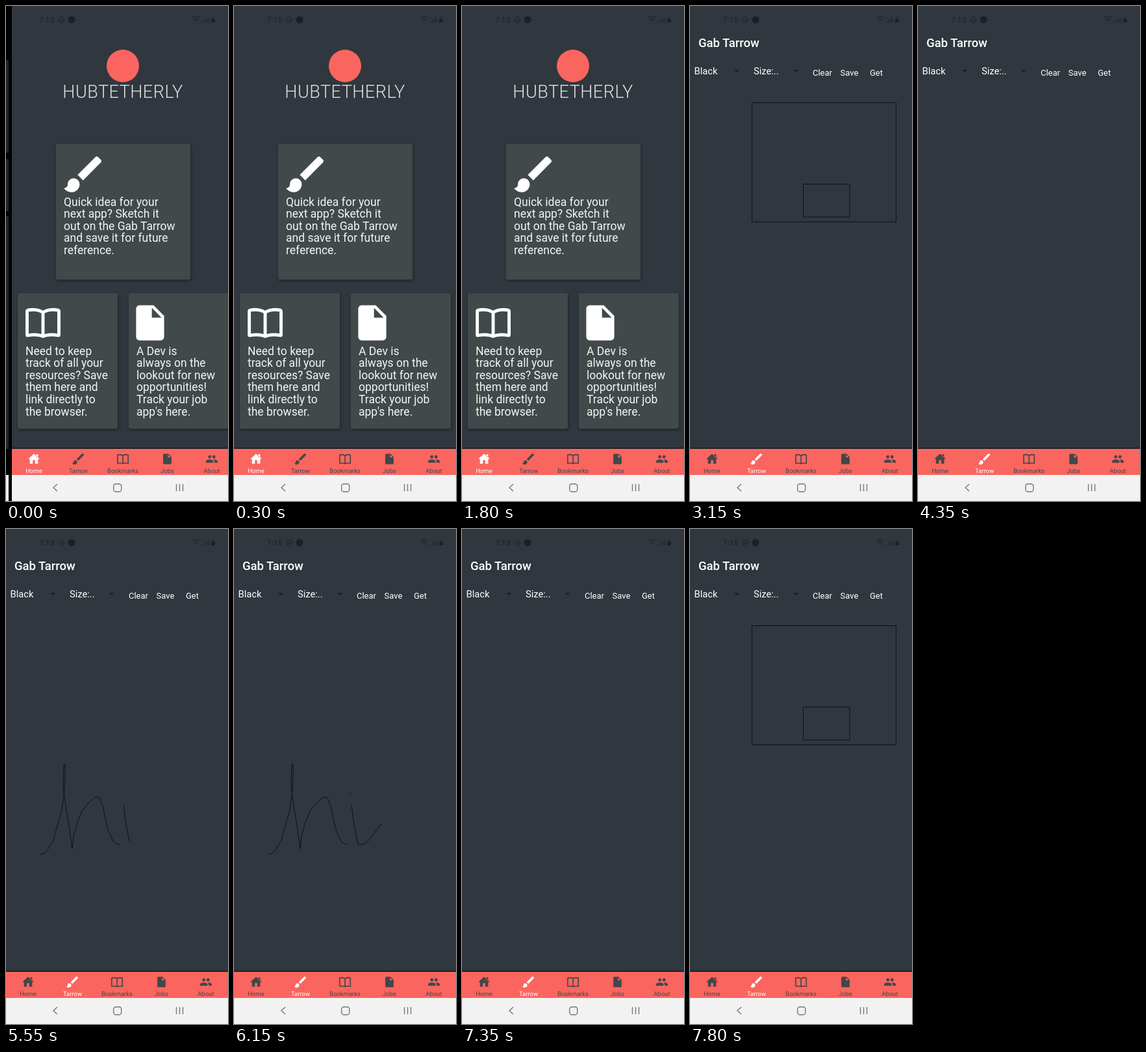
An HTML page for the animation above (8 s loop, 342 by 760 pixels).

```html
<!DOCTYPE html>
<html lang="en">
<head>
<meta charset="utf-8">
<style>
  html, body { margin: 0; height: 100%; overflow: hidden; background: #30373e; }
  svg { display: block; width: 342px; height: 760px; font-family: Roboto, sans-serif; }
  .card rect { fill: #41494b; filter: drop-shadow(1px 2px 2px #0005); }
  .card text { font-size: 17.5px; fill: #f4f5f5; }
  .card path { fill: #fff; }
  .tab { fill: #41474a; }
  .tab.on { fill: #fff; }
  .tab text { font-size: 9.5px; text-anchor: middle; }
  .tools { font-size: 13px; fill: #fff; }
  .line { fill: none; stroke: #0d1115; }
  .status { fill: #1a2025; stroke: #1a2025; }
  .nav { fill: none; stroke: #777; stroke-width: 1.4; }
</style>
</head>
<body>
<svg viewBox="0 0 342 760">
  <rect width="342" height="760" fill="#30373e"/>
  <g class="status">
    <text x="51" y="25" font-size="11.5" stroke="none" letter-spacing=".4">7:15</text>
    <circle cx="85" cy="21" r="4.5" fill="none"/>
    <path d="M83 21l2 2 3-4" fill="none"/>
    <circle cx="101" cy="21" r="5.5" stroke="none"/>
    <path d="M287 18q6-4 12 0M289 21q4-3 8 0M291 23q2-1 4 0" fill="none"/>
    <path d="M303 25.500v-2M306 25.500v-4M309 25.500v-6M312 25.500v-8" fill="none"/>
    <path d="M316 20h6v5h-6zM318 17h2v2h-2z" stroke="none"/>
  </g>

  <g id="app">
    <g id="home">
      <circle cx="171" cy="92" r="25" fill="#fb655f"/>
      <text x="171" y="141" font-size="27" font-weight="300" letter-spacing=".5" text-anchor="middle" fill="#dfe2e3">HUBTETHERLY</text>
    </g>
    <g id="napkin">
      <text x="13" y="63" font-size="18.500" font-weight="500" fill="#fff">Gab Tarrow</text>
      <g class="tools">
        <text x="6.500" y="105" font-size="14.700">Black</text>
        <text x="98" y="105" font-size="14.700">Size:..</text>
        <text x="189" y="107">Clear</text>
        <text x="231.500" y="107">Save</text>
        <text x="277" y="107">Get</text>
      </g>
      <path d="M68 98h8l-4 4zM159 98h8l-4 4z" fill="#1a2025"/>
      <path id="boxes" class="line" d="M95.500 148.500h222v183h-222zM174.500 273.500h71.500v50.500h-71.500z"/>
      <g id="ink"></g>
    </g>
    <rect y="678" width="342" height="2" fill="#1f2327"/>
    <rect y="680" width="342" height="40" fill="#fb655f"/>
    <g id="tabs"></g>
  </g>

  <rect y="720" width="342" height="40" fill="#f2f2f2"/>
  <path class="nav" d="M79 734l-6 5.500 6 5.500M262.500 734v11M267.500 734v11M272.500 734v11"/>
  <rect class="nav" x="165.700" y="733.700" width="12" height="12" rx="3.500"/>

  <g id="edge">
    <path d="M0 0h9v760H0z"/>
    <path d="M0 83h4v142H0zM0 235h4v80H0zM0 323h4v357H0z" fill="#20272c"/>
    <path d="M0 720h4v40H0z" fill="#f2f2f2"/>
  </g>
</svg>
<script>
const $ = id => document.getElementById(id);

// Icons on a 24 x 24 grid
const icons = {
  home: 'M10 20v-6h4v6h5v-8h3L12 3 2 12h3v8zM16 4h3v5h-3z',
  brush: 'M7 14c-1.660 0-3 1.340-3 3 0 1.310-1.160 2-2 2 .92 1.220 2.490 2 4 2 2.210 0 4-1.790 4-4 0-1.660-1.340-3-3-3zm13.710-9.370l-1.340-1.340c-.39-.39-1.020-.39-1.410 0L9 12.250 11.750 15l8.960-8.960c.39-.39.39-1.020 0-1.410z',
  book: 'M12 4.500C9.500 2.700 5 2.600 2.600 3.200Q1 3.500 1 5V19.500Q1 21.300 2.800 21C6 20.400 9.500 20.600 12 21.700C14.500 20.600 18 20.400 21.200 21Q23 21.300 23 19.500V5Q23 3.500 21.400 3.200C19 2.600 14.500 2.700 12 4.500zM11 6.200V19.200Q7 18.200 3 18.900V5.200Q8 4.500 11 6.200zM13 6.200V19.200Q17 18.200 21 18.900V5.200Q16 4.500 13 6.200z',
  file: 'M6 2c-1.100 0-2 .9-2 2v16c0 1.100.9 2 2 2h12c1.100 0 2-.9 2-2V8l-6-6zm7 7V3.500L18.500 9z',
  people: 'M16 11a3 3 0 1 0 0-6 3 3 0 0 0 0 6zM8 11a3 3 0 1 0 0-6 3 3 0 0 0 0 6zm0 2c-2.330 0-7 1.170-7 3.500V19h14v-2.500c0-2.330-4.670-3.500-7-3.500zm8 0c-.29 0-.62.02-.97.05 1.160.84 1.970 1.970 1.970 3.450V19h6v-2.500c0-2.330-4.670-3.500-7-3.500z'
};

const icon = (name, cx, cy, scale) =>
  `<path fill-rule="evenodd" d="${icons[name]}" transform="translate(${cx - 12 * scale} ${cy - 12 * scale}) scale(${scale})"/>`;

function card(x, y, width, image, lines) {
  const text = lines.map((line, i) => `<text x="${x + 12}" y="${y + 94.5 + i * 18.6}">${line}</text>`);
  return `<g class="card"><rect x="${x}" y="${y}" width="${width}" height="208" rx="3"/>${image}${text.join('')}</g>`;
}

$('home').innerHTML +=
  card(68, 212, 207, icon('brush', 110.5, 258.5, 3.05),
    ['Quick idea for your', 'next app? Sketch it', 'out on the Gab Tarrow', 'and save it for future', 'reference.']) +
  card(9, 441, 154, icon('book', 48, 486, 2.45),
    ['Need to keep', 'track of all your', 'resources? Save', 'them here and', 'link directly to', 'the browser.']) +
  card(180, 441, 154, icon('file', 213, 486.5, 2.7),
    ['A Dev is', 'always on the', 'lookout for new', 'opportunities!', 'Track your job', "app's here."]);

$('tabs').innerHTML = [
  ['Home', 'home', .9], ['Tarrow', 'brush', .95], ['Bookmarks', 'book', .82], ['Jobs', 'file', .8], ['About', 'people', .82]
].map(([label, name, scale], i) => {
  const x = 34 + i * 68.5;
  return `<g class="tab">${icon(name, x, 695.5, scale)}<text x="${x}" y="717">${label}</text></g>`;
}).join('');
const tabs = [...$('tabs').children];

// Pen strokes: start time, end time, points
const strokes = [
  [4350, 4800, '52,500 58,498 63,494 73,478 80,452 86,432 89,410 91,385 91,361 89,361 88,395 92,425 97,455 102,491'],
  [4800, 5250, '102,491 104,472 110,450 117,433 126,422 134,414 139,411 144,413 149,426 154,449 158,465 166,481 175,485'],
  [5400, 5700, '181,424 184,447 188,470 191,484 197,485 204,482 216,467 227,452'],
  [5850, 6000, '178,409 179,406 181,404']
];
$('ink').innerHTML = strokes.map(s => `<path class="line" pathLength="1" d="M${s[2]}"/>`).join('');
const inkPaths = [...$('ink').children];

const LOOP = 8000, STEP = 150, OPEN = 3150, CLEAR = 4350, WIPE = 7350, RELOAD = 7500;
const show = (el, on) => el.style.display = on ? '' : 'none';

function draw(now) {
  const t = Math.floor(now % LOOP / STEP) * STEP;
  const sliding = t < 150, drawing = t >= OPEN;
  $('app').setAttribute('transform', `translate(${sliding ? 9 : 0})`);
  show($('edge'), sliding);
  show($('home'), !drawing);
  show($('napkin'), drawing);
  show($('boxes'), t < CLEAR || t >= RELOAD);
  show($('ink'), t < WIPE);
  tabs.forEach((tab, i) => tab.classList.toggle('on', i === (drawing ? 1 : 0)));
  strokes.forEach(([start, end], i) => {
    const p = Math.min(1, Math.max(0, (t - start) / (end - start)));
    show(inkPaths[i], p > 0);
    inkPaths[i].setAttribute('stroke-dasharray', p < 1 ? `${p} 2` : 'none');
  });
  requestAnimationFrame(draw);
}
requestAnimationFrame(draw);
</script>
</body>
</html>
```
